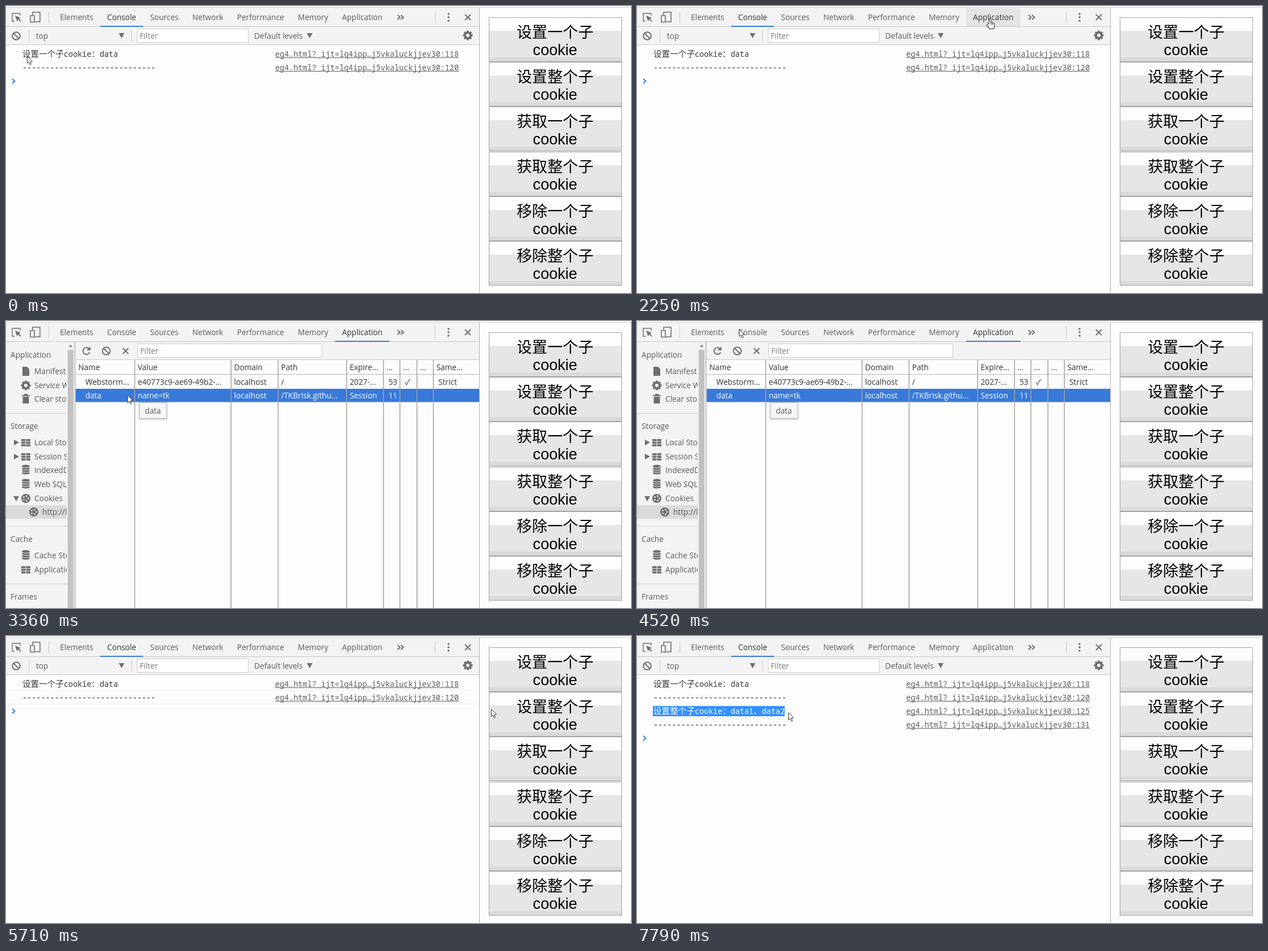
Write an HTML page with a canvas that moves like this. It is 1103x508 px and loops after 8000 ms.

```html
<!DOCTYPE html>
<html lang="zh">
<head>
<meta charset="utf-8">
<style>
html, body { margin: 0; width: 100%; height: 100%; overflow: hidden; background: #fdfdfd; }
canvas { display: block; }
</style>
</head>
<body>
<canvas id="stage" width="1103" height="508"></canvas>
<script>
const c = document.getElementById('stage').getContext('2d');
const LOOP = 8000, STEP = 141;
const UI = '13.7px "Open Sans", "Noto Sans", sans-serif';
const MONO = '13.5px "Noto Sans Mono", "DejaVu Sans Mono", monospace';
const HAN = '300 14.6px "Noto Sans CJK SC", "Noto Sans CJK", sans-serif';
const BTN = '27.1px "Liberation Sans", "Noto Sans CJK SC", "Noto Sans CJK", sans-serif';
const BLUE = '#3879d9', GREY = '#5a5a5a', BAR = '#f3f3f3', ICON = '#6e6e6e', LINE = '#c6c6c6';

// When the page reacts.
const at = {
  drag: 423, clear: 1680, open: 2400, row: 3110, tip: 3360, back: 4920,
  enter: 5717, press: 5850, release: 5970, leave: 6260, drag2: 6690
};

// Pointer stops: time, x, y.
const path = [
  [0, 37, 88], [at.drag, 28, 86], [1130, 201, 85], [at.clear, 300, 78], [2250, 617, 22],
  [at.open, 619, 22], [2680, 560, 47], [at.row, 214, 131], [3990, 214, 131],
  [4390, 180, 14], [at.back, 177, 33], [at.enter, 945, 142], [6120, 945, 142],
  [at.leave, 198, 165], [at.drag2, 27, 135], [7790, 267, 135]
];

const between = (t, a, b) => t >= a && t < b;

// The pointer is refreshed every STEP ms, counted from each stop.
function pointer(t) {
  let i = path.length - 1;
  while (path[i][0] > t) i--;
  const [t0, x0, y0] = path[i], [t1, x1, y1] = path[i + 1] || path[i];
  const k = t1 > t0 ? Math.floor((t - t0 + 3) / STEP) * STEP / (t1 - t0) : 0;
  return { x: Math.round(x0 + (x1 - x0) * k), y: Math.round(y0 + (y1 - y0) * k) };
}

function rect(x, y, w, h, color) {
  c.fillStyle = color;
  c.fillRect(x, y, w, h);
}

function frame(x, y, w, h, color) {
  c.strokeStyle = color;
  c.lineWidth = 1;
  c.strokeRect(x + .5, y + .5, w - 1, h - 1);
}

function label(s, x, y, color = GREY, font = UI, align = 'left') {
  c.font = font;
  c.textAlign = align;
  c.fillStyle = color;
  c.fillText(s, x, y);
}

function poly(points, color, width = 0, close = true) {
  c.beginPath();
  points.forEach(([x, y]) => c.lineTo(x, y));
  if (close) c.closePath();
  c.fillStyle = c.strokeStyle = color;
  c.lineWidth = width;
  if (width) c.stroke();
  else c.fill();
}

function disc(x, y, r, color) {
  c.beginPath();
  c.arc(x, y, r, 0, 7);
  c.fillStyle = color;
  c.fill();
}

function ring(x, y, r, width, from = 0, to = 2 * Math.PI) {
  c.beginPath();
  c.arc(x, y, r, from, to);
  c.lineWidth = width;
  c.strokeStyle = ICON;
  c.stroke();
}

function clipped(x, y, w, h, paint) {
  c.save();
  c.beginPath();
  c.rect(x, y, w, h);
  c.clip();
  paint();
  c.restore();
}

// Calls fn with the direction of each of n spokes.
function spokes(n, fn) {
  for (let i = 0; i < n; i++) fn(Math.cos(i * 2 * Math.PI / n), Math.sin(i * 2 * Math.PI / n));
}

function cross(x, y, r) {
  for (const s of [-1, 1]) poly([[x - r, y - r * s], [x + r, y + r * s]], ICON, 2, false);
}

function block(x, y) {
  ring(x, y, 6.8, 2);
  poly([[x - 4.8, y - 4.8], [x + 4.8, y + 4.8]], ICON, 2, false);
}

const down = (x, y) => poly([[x - 5, y - 4], [x + 5, y - 4], [x, y + 5]], ICON);
const right = (x, y) => poly([[x - 4, y - 5], [x + 5, y], [x - 4, y + 5]], ICON);
const chevron = (x, y, color) => poly([[x, y - 4], [x + 4.5, y], [x, y + 4]], color, 2, false);
const divider = (x, y) => rect(x, y, 1, 20, LINE);

function filterBox(x, w) {
  rect(x, 40, w, 25, '#fff');
  frame(x, 40, w, 25, '#cbcbcb');
  label('Filter', x + 5, 58, '#777');
}

const icons = {
  file(x, y) {
    poly([[x - 6, y - 8], [x + 2, y - 8], [x + 6, y - 4], [x + 6, y + 8], [x - 6, y + 8]], ICON);
  },
  gear(x, y) {
    ring(x, y, 5, 4);
    spokes(8, (u, v) => poly([[x + 6 * u, y + 6 * v], [x + 8.6 * u, y + 8.6 * v]], ICON, 3.4, false));
  },
  bin(x, y) {
    rect(x - 7, y - 7, 14, 2, ICON);
    rect(x - 3, y - 9, 6, 2, ICON);
    rect(x - 5.5, y - 4, 11, 12, ICON);
  },
  grid(x, y) {
    for (let i = 0; i < 6; i++) rect(x - 8 + i % 2 * 8.5, y - 6 + (i >> 1) * 4.6, 7.5, 3.6, ICON);
  },
  db(x, y) {
    for (let i = 0; i < 4; i++) {
      c.beginPath();
      c.ellipse(x, y + 5 - i * 4, 7.5, 3, 0, 0, 7);
      c.fillStyle = ICON;
      c.fill();
      c.lineWidth = .9;
      c.strokeStyle = BAR;
      c.stroke();
    }
  },
  cookie(x, y) {
    disc(x, y, 8, ICON);
    spokes(5, (u, v) => disc(x + 4.2 * u, y + 4.2 * v, 1.4, BAR));
  }
};

// Tabs are as wide as their label plus padding.
const PAD = 12.2;
c.font = UI;
let edge = 83;
const tabs = ['Elements', 'Console', 'Sources', 'Network', 'Performance', 'Memory', 'Application']
  .map(name => {
    const w = c.measureText(name).width + 2 * PAD;
    edge += w;
    return { name, x: edge - w, w };
  });
const consoleTab = tabs[1], appTab = tabs[6];

function topBar(t, tab, hover) {
  rect(0, 2, 1103, 1, '#cdcdcd');
  rect(0, 3, 835, 33, BAR);
  if (hover) rect(hover.x, 4, hover.w, 32, '#e4e4e4');
  rect(0, 36, 835, 1, LINE);
  for (const item of tabs)
    label(item.name, item.x + PAD, 25, item === tab || item === hover ? '#333' : GREY);

  // The underline is still sliding in just after a switch.
  const sliding = between(t, at.open, at.open + STEP) || between(t, at.back, at.back + STEP);
  const other = tab === appTab ? consoleTab : appTab;
  rect(tab.x + (sliding ? .075 * (other.x - tab.x) : 0), 35, tab.w, 2, BLUE);

  divider(75, 10);
  divider(757, 10);
  poly([[25, 17], [25, 13], [11, 13], [11, 27], [15, 27]], ICON, 1.4, false);
  poly([[16, 17], [26, 21], [22, 23], [19.5, 27]], ICON);
  poly([[21, 22], [26, 27]], ICON, 2, false);
  poly([[47, 16], [47, 11], [60, 11], [60, 28], [51, 28]], ICON, 1.6, false);
  poly([[43, 17], [50, 17], [50, 28.5], [43, 28.5]], ICON, 1.6);
  chevron(691, 20, ICON);
  chevron(697, 20, ICON);
  for (const y of [14, 20, 26]) disc(781, y, 1.8, ICON);
  cross(815, 20, 5);
}

const DASHES = '-'.repeat(29);
const logs = [
  ['设置一个子cookie：data', 118], [DASHES, 120],
  ['设置整个子cookie：data1、data2', 125], [DASHES, 131]
];

// Monospace text with wider Han glyphs; returns the edge after each character.
function mixed(s, x, y, color) {
  const edges = [x];
  for (const ch of s) {
    label(ch, x, y, color, ch > '\u2fff' ? HAN : MONO);
    x += c.measureText(ch).width;
    edges.push(x);
  }
  return edges;
}

function select(text, edges, y, x) {
  const end = edges.reduce((best, e) => Math.abs(e - x) < Math.abs(best - x) ? e : best);
  if (end > 29) clipped(28, y - 14, end - 28, 18, () => {
    rect(28, y - 14, end - 28, 18, '#3390ff');
    mixed(text, 29, y, '#fff');
  });
}

function consolePanel(t, mouse) {
  rect(0, 37, 835, 31, BAR);
  rect(0, 68, 835, 1, LINE);
  block(18, 53);
  divider(40, 43);
  label('top', 53, 58);
  down(204, 52);
  divider(221, 43);
  filterBox(231, 197);
  label('Default levels', 438, 58);
  down(536, 52);
  icons.gear(815, 52);

  const count = t < at.release ? 2 : 4;
  logs.slice(0, count).forEach(([text, line], i) => {
    const y = 90 + i * 24;
    if (between(t, at.back, at.release)) rect(0, y + 6, 835, 1, '#efefef');
    const edges = mixed(text, 29, y, '#383838');
    const picked = i === 0 && between(t, at.drag, at.clear) || i === 2 && t >= at.drag2;
    if (picked) select(text, edges, y, mouse.x);

    const color = i === 3 && t < at.leave + STEP ? '#222' : '#5e5e5e';
    const link = 'eg4.html?_ijt=lq4ipp…j5vkaluckjjev30:' + line;
    label(link, 475, y, color, MONO);
    rect(475, y + 1, c.measureText(link).width, 1, color);
  });
  chevron(11, 85 + count * 24, '#367cf1');
}

const sections = [
  ['Application', ['Manifest', 'file'], ['Service Workers', 'gear'], ['Clear storage', 'bin']],
  ['Storage', ['Local Storage', 'grid', right], ['Session Storage', 'grid', right],
    ['IndexedDB', 'db'], ['Web SQL', 'db'], ['Cookies', 'cookie', down],
    ['http://localhost', 'cookie', null, true]],
  ['Cache', ['Cache Storage', 'db'], ['Application Cache', 'grid']],
  ['Frames']
];

function sidebar(focused) {
  rect(0, 37, 122, 471, BAR);
  clipped(0, 37, 107, 471, () => {
    let y = 60;
    for (const [title, ...items] of sections) {
      label(title, 8, y + 5);
      y += 4.5;
      for (const [name, icon, arrow, current] of items) {
        y += 24.65;
        const row = Math.round(y), x = current ? 49 : 35;
        if (current) rect(0, row - 12, 108, 24, focused ? BLUE : '#dadada');
        if (arrow) arrow(18, row);
        icons[icon](x, row);
        label(name, x + 15, row + 5, current && focused ? '#fff' : GREY);
      }
      y = Math.round(y + 25);
      rect(0, y, 108, 1, '#d4d4d4');
      y += 23;
    }
  });
  rect(108, 37, 13, 471, '#f1f1f1');
  rect(109, 51, 10, 457, '#c1c1c1');
  poly([[111, 46], [117, 46], [114, 42]], '#777');
  rect(121, 37, 1.5, 471, '#b5b5b5');
}

// Left edge, heading and the two cells of each column.
const columns = [
  [122, 'Name', 'Webstorm...', 'data'],
  [227, 'Value', 'e40773c9-ae69-49b2-...', 'name=tk'],
  [397, 'Domain', 'localhost', 'localhost'],
  [480, 'Path', '/', '/TKBrisk.githu...'],
  [601, 'Expire...', '2027-...', 'Session'],
  [666, '...', '53', '11'],
  [695, '...', '✓', ''],
  [725, '...', '', ''],
  [754, 'Same...', 'Strict', '']
];

function tooltip(s, x, y) {
  c.save();
  c.shadowColor = 'rgba(0,0,0,.3)';
  c.shadowBlur = 3;
  c.shadowOffsetY = 1;
  rect(x, y, 49, 29, '#f6f6f6');
  c.restore();
  frame(x, y, 49, 29, '#bdbdbd');
  label(s, x + 10, y + 20);
}

function appPanel(t) {
  const picked = t >= at.row;
  rect(123, 37, 712, 31, BAR);
  rect(123, 68, 712, 1, LINE);
  ring(142, 53, 6, 2, .4, 5.4);
  poly([[149, 45], [149, 52], [142, 52]], ICON);
  block(177, 53);
  cross(211, 53, 5);
  filterBox(232, 326);
  rect(123, 94, 712, 1, '#b5b5b5');
  if (picked) rect(123, 120, 712, 23.5, BLUE);
  columns.forEach(([x, head, ...cells], i) => {
    if (i) rect(x - .5, 69, 1.5, 439, '#a3a3a3');
    label(head, x + 5.5, 87, '#333');
    const indent = i === 0 ? 18 : i > 4 ? 9 : 5.5;
    cells.forEach((s, r) => label(s, x + indent, 113 + r * 24, r && picked ? '#fff' : '#333'));
  });
  sidebar(!picked);
  if (t >= at.tip) tooltip('data', 235, 144);
}

function buttons(t) {
  ['设置', '获取', '移除'].forEach((verb, i) => ['一个子', '整个子'].forEach((noun, j) => {
    const y = Math.floor(20 + (i * 2 + j) * 79.35);
    const active = i === 0 && j === 1;
    const pressed = active && between(t, at.press, at.release);
    rect(852, y, 235, 79, pressed ? '#e8e8e8' : '#fdfdfd');
    rect(852, y + 24, 235, 55, pressed ? '#d8d8d8' : '#e6e6e6');
    rect(852, y + 71, 235, 8, pressed ? '#cecece' : '#dadada');
    frame(852, y, 235, 79, active && between(t, at.enter, at.leave) ? '#858585' : '#a2a2a2');
    label(verb + noun, 969, y + 36, '#000', BTN, 'center');
    label('cookie', 969, y + 67, '#000', BTN, 'center');
  }));
}

function arrow(x, y) {
  const pts = [[0, 0], [0, 13], [3, 10.4], [5, 15.3], [7, 14.4], [5, 9.7], [9, 9.5]]
    .map(([u, v]) => [x + .5 + u, y + .5 + v]);
  poly(pts, '#fff');
  poly(pts, '#3a3a3a', 1);
}

function hand(x, y) {
  for (const [grow, color] of [[1, '#222'], [0, '#fff']]) {
    c.beginPath();
    c.roundRect(x + 5 - grow, y + 1 - grow, 2 + 2 * grow, 12 + 2 * grow, 1 + grow);
    c.roundRect(x + 4 - grow, y + 8 - grow, 9 + 2 * grow, 10 + 2 * grow, 2 + grow);
    c.roundRect(x + 1 - grow, y + 10 - grow, 5 + 2 * grow, 4 + 2 * grow, 2 + grow);
    c.fillStyle = color;
    c.fill();
  }
  for (const u of [7.5, 10]) rect(x + u, y + 8, .8, 4, '#222');
}

function draw(t) {
  const mouse = pointer(t);
  const tab = between(t, at.open, at.back) ? appTab : consoleTab;
  // The page stalls before it switches back, so nothing reacts there.
  const stalled = between(t, at.row, at.back);
  const hover = mouse.y < 36 && !stalled
    && tabs.find(({ x, w }) => between(mouse.x + 5, x, x + w));

  rect(0, 0, 1103, 508, '#fdfdfd');
  topBar(t, tab, hover);
  if (tab === appTab) appPanel(t);
  else consolePanel(t, mouse);
  rect(835, 3, 1, 505, '#b0b0b0');
  buttons(t);
  (hover ? hand : arrow)(mouse.x, mouse.y);
}

const start = performance.now();
function tick() {
  draw((performance.now() - start) % LOOP);
  requestAnimationFrame(tick);
}
tick();
</script>
</body>
</html>
```
